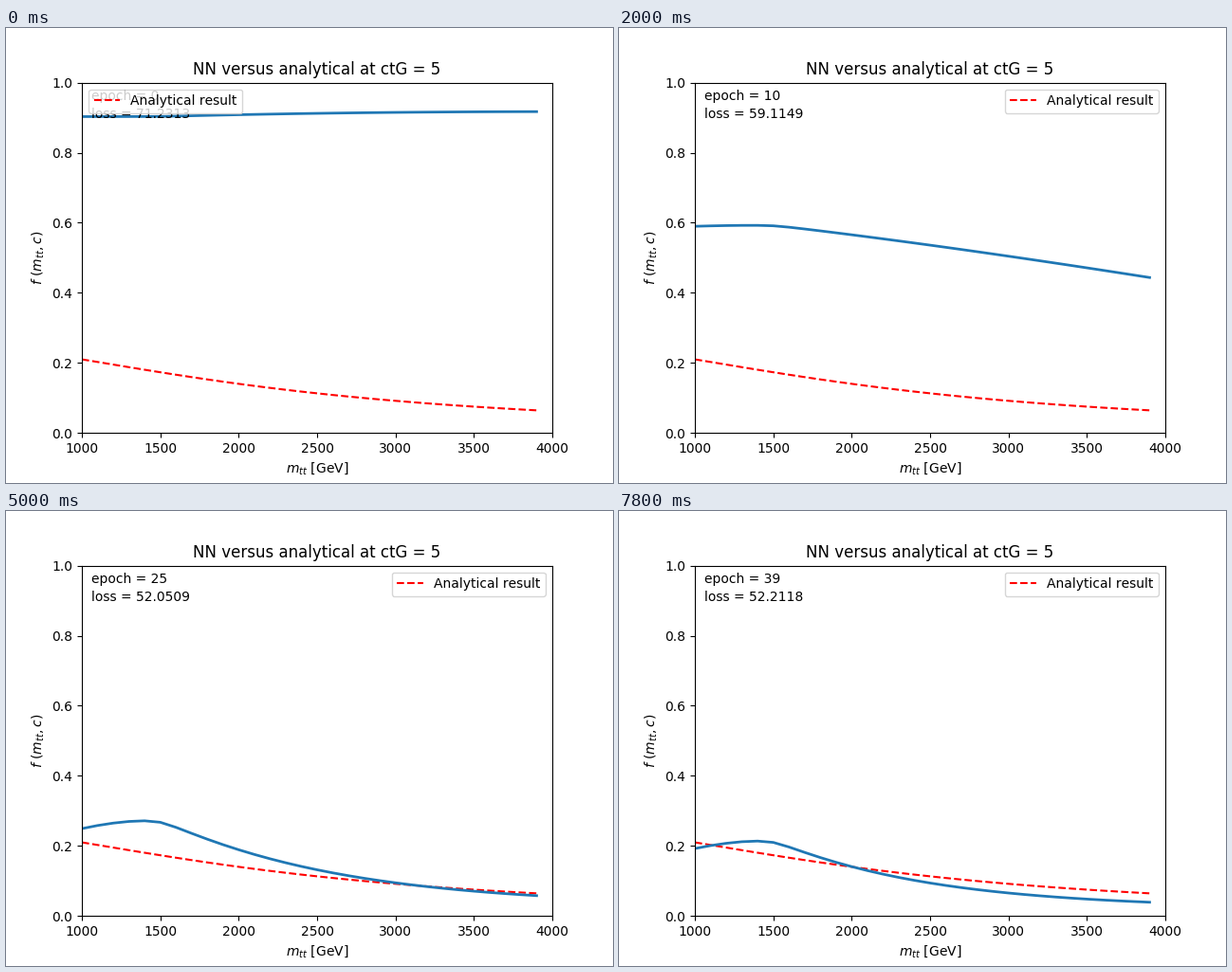
A matplotlib script for the animation above (8 s loop, 640x480 px).

```python
import numpy as np
import matplotlib.pyplot as plt
from matplotlib.animation import FuncAnimation

EPOCHS = 40
STEP_MS = 200

# Training progress at a few epochs
KEY_EPOCHS = np.array([0, 4, 10, 15, 25, 33, 39])
KEY_LOSS = [71.2313, 65.8946, 59.1149, 55.0521, 52.0509, 52.3932, 52.2118]
KEY_LEVEL = [2.231, 1.311, 0.378, -0.18, -0.967, -1.288, -1.281]
KEY_SLOPE = [-0.137, -0.01, 0.22, 0.45, 1.03, 1.16, 1.115]


def smooth(epoch, values):
    """Cubic Hermite curve through the key epochs."""
    keys, values = KEY_EPOCHS, np.array(values)
    slopes = np.gradient(values, keys, edge_order=2)
    i = min(np.searchsorted(keys, epoch, side="right"), len(keys) - 1) - 1
    h = keys[i + 1] - keys[i]
    t = (epoch - keys[i]) / h
    return ((1 + 2 * t) * (1 - t) ** 2 * values[i]
            + t * (1 - t) ** 2 * h * slopes[i]
            + t ** 2 * (3 - 2 * t) * values[i + 1]
            + t ** 2 * (t - 1) * h * slopes[i + 1])


def network(mass, epoch):
    """Sigmoid of a curve that rises up to 1500 GeV and bends down after it."""
    x = (mass - 1500) / 1000
    below = np.maximum(-2 * x, 0)
    above = (x + np.hypot(x, 0.08)) / 2
    ramp = np.tanh((epoch - 18) / 7)
    rise = 0.075 * (1 + ramp)
    bend = 0.052 + 0.08 * ramp
    logit = (smooth(epoch, KEY_LEVEL) - rise * below ** 2
             - smooth(epoch, KEY_SLOPE) * above + bend * above ** 2)
    return 1 / (1 + np.exp(-logit))


def analytical(mass):
    u = (mass - 1000) / 1000
    return 1 / (4.762 + 1.67 * u + 0.7 * u ** 2)


plt.rcParams["text.kerning_factor"] = 6
mass = np.arange(1000, 4000, 100)

fig, ax = plt.subplots(figsize=(6.4, 4.8), dpi=100)
ax.set(xlim=(1000, 4000), ylim=(0, 1),
       title="NN versus analytical at ctG = 5",
       xlabel="$m_{tt}$ [GeV]", ylabel=r"$f\ (m_{tt},c)$")
ax.plot(mass, analytical(mass), "r--", label="Analytical result")
line, = ax.plot([], [], lw=2, color="C0")
epoch_text = ax.text(0.02, 0.95, "", transform=ax.transAxes)
loss_text = ax.text(0.02, 0.90, "", transform=ax.transAxes)
legend = ax.legend(loc="upper right")


def update(epoch):
    curve = network(mass, epoch)
    line.set_data(mass, curve)
    epoch_text.set_text(f"epoch = {epoch}")
    loss_text.set_text(f"loss = {smooth(epoch, KEY_LOSS):.4f}")
    # The legend gives way while the curve crosses the upper right corner
    legend.set_loc("upper left" if curve[-1] > 0.91 else "upper right")
    return line, epoch_text, loss_text, legend


anim = FuncAnimation(fig, update, frames=EPOCHS, interval=STEP_MS,
                     init_func=lambda: update(0), repeat=True, repeat_delay=0)
plt.show()
```
